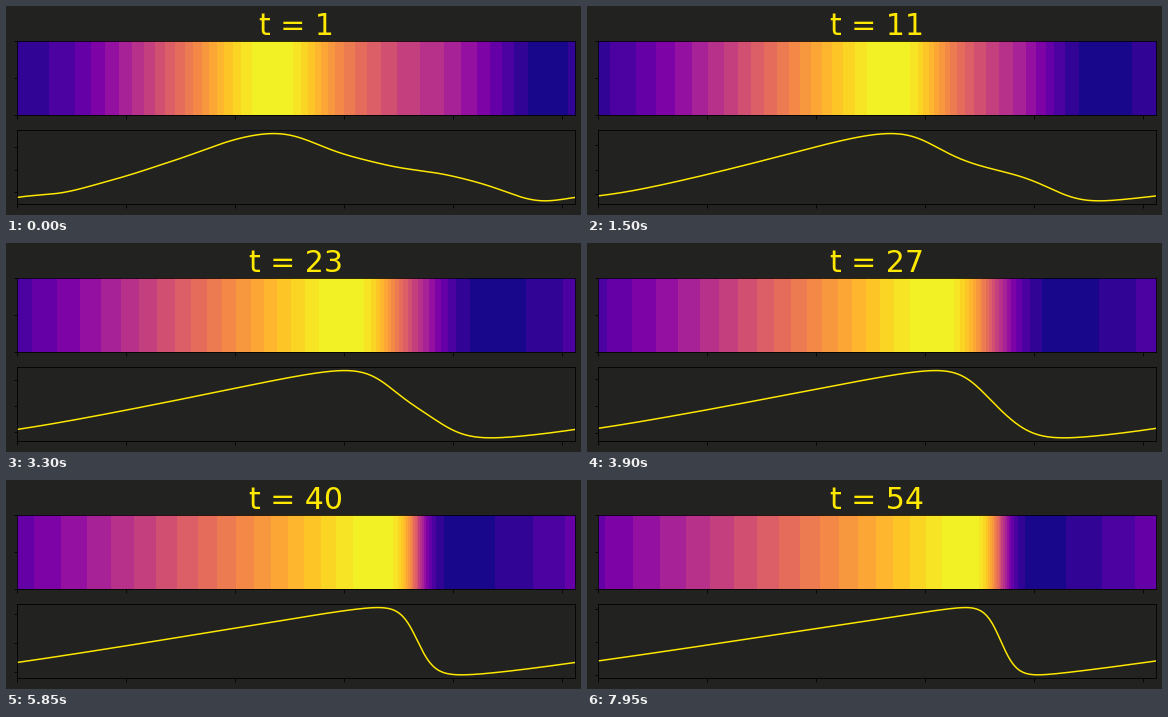
Animation of 575x209 px, one loop 8000 ms. Source, as a matplotlib script:

```python
import numpy as np
import matplotlib.pyplot as plt
from matplotlib.animation import FuncAnimation
from matplotlib.colors import ListedColormap

W, H, DPI = 575, 209, 72
BACK, YELLOW = "#222220", "#ffe900"
N = 1024                 # grid cells along the periodic domain
LENGTH = 558.0           # domain length in pixels
SPEED = 2.8              # pixels per step for a wave height of 1
VISCOSITY = 26.0         # pixels squared per step
START_RANGE = 2.98       # initial crest-to-trough height
STEP_MS, TICK_MS, LOOP_MS = 150, 50, 8000

# Evenly spaced key heights of the initial wave
KEYS = [.045, .10, .20, .35, .51, .69, .87, .99,
        .95, .76, .60, .49, .41, .30, .13, 0]

# Colour bands grow wider from crest to trough
band = np.arange(20, 0, -1)
LEVELS = 1 - .031 * band - .00087 * band ** 2

k = 2 * np.pi * np.arange(N // 2 + 1) / LENGTH


def initial_phi():
    """Cole-Hopf transform of the initial wave, in Fourier space."""
    height = np.fft.irfft(np.fft.rfft(KEYS), N) * N / len(KEYS)
    u = np.fft.rfft(height * START_RANGE * SPEED)
    integral = np.zeros_like(u)
    integral[1:] = u[1:] / (1j * k[1:])
    potential = np.fft.irfft(integral, N)
    return np.fft.rfft(np.exp(-potential / (2 * VISCOSITY)))


PHI = initial_phi()


def wave(t):
    """Viscous Burgers solution after t steps."""
    phi = PHI * np.exp(-VISCOSITY * k ** 2 * t)
    slope = np.fft.irfft(1j * k * phi, N)
    return -2 * VISCOSITY * slope / np.fft.irfft(phi, N) / SPEED


def bands(u):
    return np.digitize((u - u.min()) / np.ptp(u), LEVELS)[None, :]


def add_axes(bottom):
    ax = fig.add_axes([11.3 / W, bottom / H, LENGTH / W, 74 / H])
    ax.set_facecolor(BACK)
    ax.tick_params(labelbottom=False, labelleft=False)
    return ax


fig = plt.figure(figsize=(W / DPI, H / DPI), dpi=DPI, facecolor=BACK)
top, low = add_axes(99.7), add_axes(10.8)

edges = np.array([0, *LEVELS, 1])
plasma = ListedColormap(plt.get_cmap("plasma")((edges[:-1] + edges[1:]) / 2))
image = top.imshow(bands(wave(0)), cmap=plasma, vmin=-.5, vmax=len(LEVELS) + .5,
                   aspect="auto", interpolation="nearest", extent=(0, N, 0, 1))
top.set_yticks([0, .5, 1])
title = top.set_title("", fontsize=30, color=YELLOW, pad=5.5,
                      fontname="DejaVu Sans")

line, = low.plot([], [], color=YELLOW, lw=1.5)
low.set_yticks([-1, 0, 1])
for ax in (top, low):
    ax.set_xticks(range(0, N, 200))
    ax.set_xlim(0, N)


def update(frame):
    step = frame * TICK_MS // STEP_MS
    u = wave(step)
    image.set_data(bands(u))
    line.set_data(np.arange(N + 1), np.append(u, u[0]))
    margin = .05 * np.ptp(u)
    low.set_ylim(u.min() - margin, u.max() + margin)
    title.set_text(f"t = {step + 1}")
    return image, line, title


anim = FuncAnimation(fig, update, frames=LOOP_MS // TICK_MS, interval=TICK_MS,
                     repeat=True, repeat_delay=0, blit=False)
plt.show()
```
